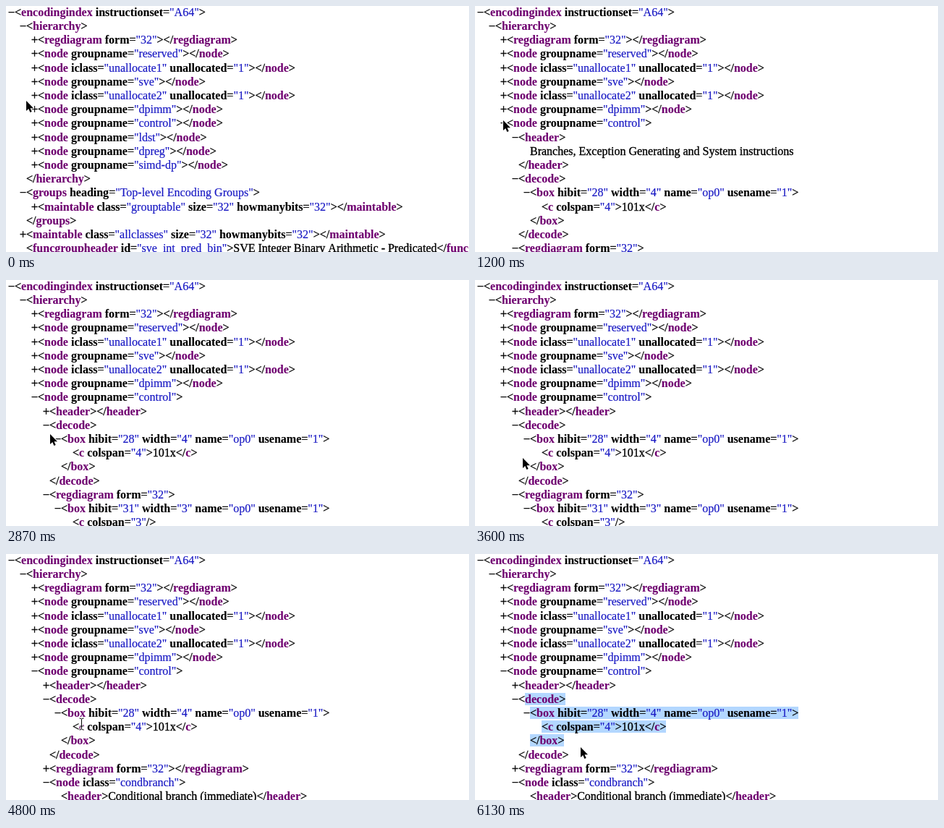
Recreate the animation shown at these times as an HTML page. Size 640x340 px, loop 6.19 s.

```html
<!DOCTYPE html>
<html lang="en">
<head>
<meta charset="utf-8">
<title>XML tree</title>
<style>
  html, body { margin: 0; width: 100%; height: 100%; overflow: hidden; background: #fff; }
  #stage { position: relative; width: 640px; height: 340px; overflow: hidden;
    font: 16px/19px "Liberation Serif", "Times New Roman", serif; color: #000;
    -webkit-text-stroke-width: .35px; }
  .view { position: absolute; inset: 0; visibility: hidden; }
  .row { position: absolute; white-space: pre; }
  .fold { position: absolute; left: -9px; -webkit-text-stroke-width: .5px; }
  .body { background: linear-gradient(#b3d7ff, #b3d7ff) no-repeat 0 0 / 0 100%; }
  b { -webkit-text-stroke-width: .12px; }
  .tag { color: #6f0070; }
  i { font-style: normal; color: #1a1ac4; -webkit-text-stroke-width: .2px; }
  svg { position: absolute; left: 0; top: 0; overflow: visible; }
</style>
</head>
<body>
<div id="stage">
  <svg width="1" height="1">
    <path id="arrow" d="M0 0V14L3.2 11.1 5.4 16 7.7 15 5.5 10.2H10Z" stroke="#fff" stroke-width="2" stroke-linejoin="round" paint-order="stroke"/>
    <g id="beam" fill="none">
      <path d="M-3-8Q0-8 0-6.5Q0-8 3-8M0-6.5V6.5M-3 8Q0 8 0 6.5Q0 8 3 8M-2 3H2" stroke="#fff" stroke-width="3"/>
      <path d="M-3-8Q0-8 0-6.5Q0-8 3-8M0-6.5V6.5M-3 8Q0 8 0 6.5Q0 8 3 8M-2 3H2" stroke="#000"/>
    </g>
  </svg>
</div>
<script>
const LOOP = 6190, PITCH = 19.2, INDENT = 16, LEFT = 12;
const SELECT_AT = 5670, SELECT_ROW = 10, SELECT_X = 69;

// Each line: depth, fold sign (or a space), markup.
const top7 = `0-<encodingindex instructionset="A64">
1-<hierarchy>
2+<regdiagram form="32"></regdiagram>
2+<node groupname="reserved"></node>
2+<node iclass="unallocate1" unallocated="1"></node>
2+<node groupname="sve"></node>
2+<node iclass="unallocate2" unallocated="1"></node>
2+<node groupname="dpimm"></node>
`;
const folded = `2+<node groupname="control"></node>
2+<node groupname="ldst"></node>
2+<node groupname="dpreg"></node>
2+<node groupname="simd-dp"></node>
1 </hierarchy>
1-<groups heading="Top-level Encoding Groups">
2+<maintable class="grouptable" size="32" howmanybits="32"></maintable>
1 </groups>
1+<maintable class="allclasses" size="32" howmanybits="32"></maintable>
1 <funcgroupheader id="sve_int_pred_bin">SVE Integer Binary Arithmetic - Predicated</funcgroupheader>`;
const control = `2-<node groupname="control">
`;
const header = `3-<header>
4 Branches, Exception Generating and System instructions
3 </header>
`;
const headerFolded = `3+<header></header>
`;
const decode = `3-<decode>
4-<box hibit="28" width="4" name="op0" usename="1">
5 <c colspan="4">101x</c>
4 </box>
3 </decode>
`;
const diagram = `3-<regdiagram form="32">`;
const diagramBox = `
4-<box hibit="31" width="3" name="op0" usename="1">
5 <c colspan="3"/>`;
const diagramFolded = `3+<regdiagram form="32"></regdiagram>
3-<node iclass="condbranch">
4 <header>Conditional branch (immediate)</header>`;

const stage = document.getElementById("stage");
const arrow = document.getElementById("arrow");
const beam = document.getElementById("beam");

// Spaces are set in bold so that words do not kern against them.
const markup = s => s.replace(/(<\/?)(\w+)|(\w+)=("[^"]*")| /g, (m, open, tag, key, value) =>
  tag ? `${open.replace("<", "&lt;")}<b class="tag">${tag}</b>` :
  key ? `<b>${key}</b>=<i>${value}</i>` : "<b> </b>");

function makeView(start, text) {
  const el = document.createElement("div");
  el.className = "view";
  el.innerHTML = text.split("\n").map((line, k) => {
    const x = LEFT + INDENT * line[0], y = Math.floor(PITCH * k + 0.3) - 1;
    const sign = line[1].replace("-", "\u2212");
    return `<div class="row" style="left:${x}px;top:${y}px"><span class="fold">${sign}</span>` +
      `<span class="body">${markup(line.slice(2))}</span></div>`;
  }).join("");
  stage.prepend(el);
  const rows = [...el.children].map(row => {
    const body = row.lastChild, x = row.offsetLeft;
    return { body, x, end: x + body.getBoundingClientRect().width };
  });
  return { start, el, rows };
}

const views = [
  makeView(0, top7 + folded),
  makeView(1200, top7 + control + header + decode + diagram),
  makeView(2470, top7 + control + headerFolded + decode + diagram + diagramBox),
  makeView(4400, top7 + control + headerFolded + decode + diagramFolded)
];

// Pointer stops: time, x, y
const path = [
  [0, 28, 131], [670, 38, 155], [800, 39, 158], [1200, 39, 158],
  [1800, 55, 173], [2270, 57, 186], [2470, 57, 186],
  [3000, 62, 222], [3130, 62, 222], [3600, 66, 246], [3800, 65, 258],
  [4130, 56, 298], [4400, 56, 298], [4800, 104, 235],
  [5000, 90, 219], [5070, 88, 217], [5400, 71, 203], [5670, 71, 203], [6130, 146, 267]
];

function pointer(t) {
  const n = path.findIndex(p => p[0] > t);
  if (n < 0) return path.at(-1).slice(1);
  const [t0, x0, y0] = path[n - 1], [t1, x1, y1] = path[n];
  const u = (t - t0) / (t1 - t0);
  return [x0 + (x1 - x0) * u, y0 + (y1 - y0) * u];
}

function select(rows, on, x, y) {
  const last = Math.floor(y / PITCH);
  rows.forEach((row, k) => {
    const from = k === SELECT_ROW ? SELECT_X : row.x;
    const to = k < last ? row.end : Math.min(x, row.end);
    const width = on && k >= SELECT_ROW && k <= last ? Math.max(0, to - from) : 0;
    row.body.style.backgroundPosition = `${from - row.x}px 0`;
    row.body.style.backgroundSize = `${width}px 100%`;
  });
}

const begin = performance.now();

function draw(now) {
  const time = Math.max(0, now - begin) % LOOP;
  const t = Math.floor((time + 4) * 0.015) / 0.015; // 15 steps a second
  const view = views.findLast(v => time >= v.start);
  for (const v of views) v.el.style.visibility = v === view ? "visible" : "hidden";

  const [x, y] = pointer(t);
  const row = view.rows[Math.floor(y / PITCH)];
  const overText = row && x >= row.x && x <= row.end;
  const at = `translate(${Math.round(x)} ${Math.round(y)})`;
  arrow.setAttribute("transform", at);
  beam.setAttribute("transform", at + " translate(.5 0)");
  arrow.style.display = overText ? "none" : "";
  beam.style.display = overText ? "" : "none";
  select(view.rows, time >= SELECT_AT, x, y);
  requestAnimationFrame(draw);
}
draw(begin);
</script>
</body>
</html>
```
